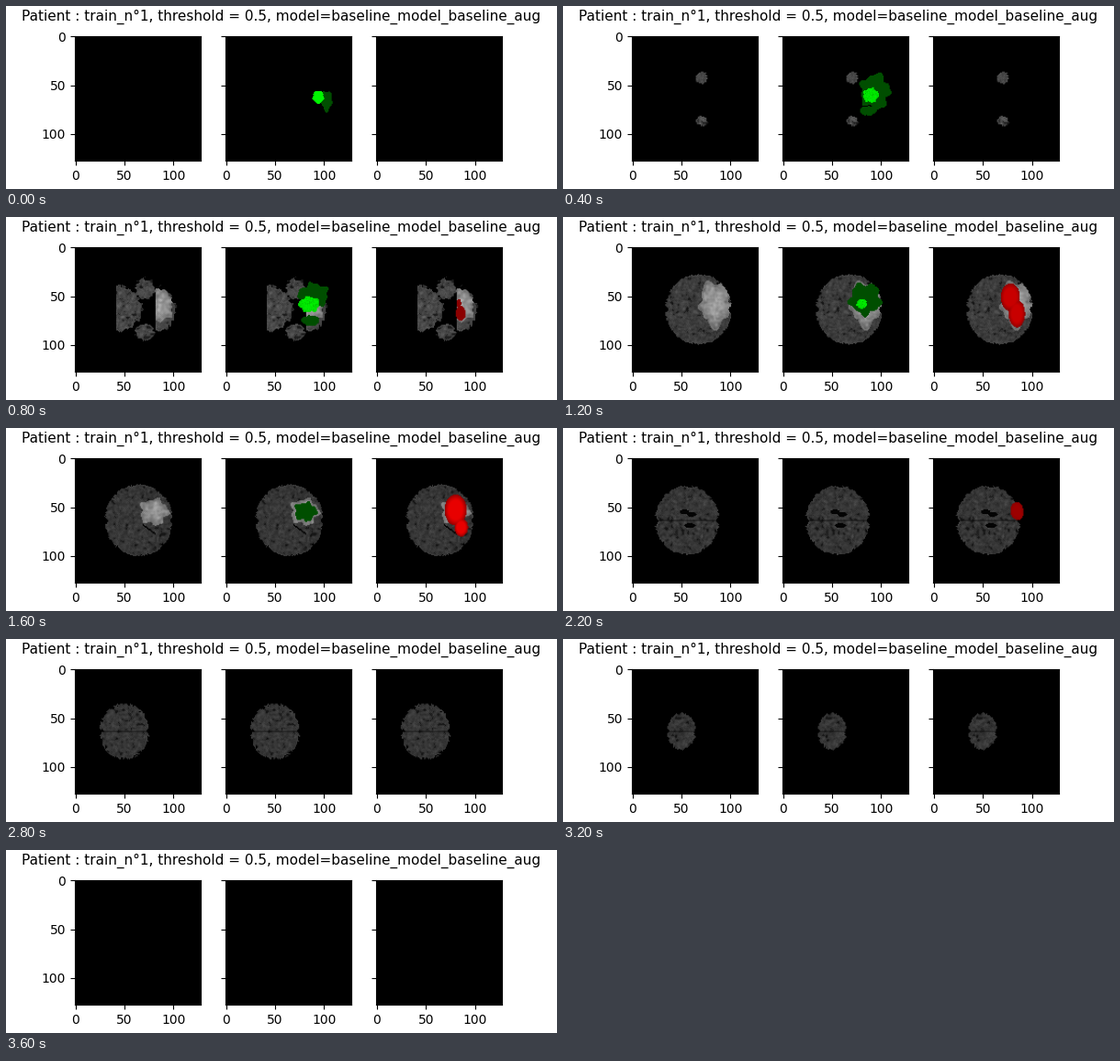
These frames come from a looping animation (600x200 px, 4 s). A matplotlib script:

```python
import numpy as np
import matplotlib.pyplot as plt
from matplotlib.animation import FuncAnimation

N, FRAMES = 128, 20
SCALE = 136.76 / N
# Shapes are given in stage pixels of the left panel.
X, Y = np.meshgrid(75 + (np.arange(N) + 0.5) * SCALE,
                   32.6 + (np.arange(N) + 0.5) * SCALE)

# Key ellipses by step: centre and radii
DARK = {0: (185, 104, 6, 11), 1: (178, 98, 16, 22), 4: (171, 86, 16, 13),
        6: (165, 90, 17, 17), 8: (162, 92, 12, 10), 10: (162, 91, 2, 2)}
LOWER = {2: (168, 115, 9, 5), 5: (167, 113, 10, 6)}
BRIGHT = {0: (176, 100, 6, 7), 4: (166, 96, 11, 8.5), 7: (159, 95, 3, 4)}
LESION = {3: (171, 98, 9, 15), 6: (166, 95, 17, 25), 8: (161, 92, 15, 14),
          10: (162, 91, 6, 6)}
RED_TOP = {4: (165, 95, 2.5, 5), 6: (159, 88, 10.5, 15), 8: (161.5, 90, 12, 17),
           11: (166, 91, 7, 9.5), 13: (167, 91, 3, 5)}
RED_LOW = {4: (167, 106, 5.5, 8), 6: (166, 106, 9, 15), 8: (167.5, 109, 7.5, 10),
           11: (168, 95, 5, 6), 13: (167, 92, 2, 4)}


def noise(rng, passes):
    a = rng.standard_normal((N, N))
    for _ in range(passes):
        a = (a + sum(np.roll(a, s, ax) for s in (-1, 1) for ax in (0, 1))) / 5
    return a / a.std()


def oval(cx, cy, rx, ry):
    """Relative distance from the centre; inside is < 1."""
    return np.hypot((X - cx) / rx, (Y - cy) / ry)


def blob(keys, k, lumps=0.0):
    """Morphing ellipse with a lumpy rim, empty outside its steps."""
    steps = list(keys)
    if not steps[0] <= k <= steps[-1]:
        return np.full((N, N), 9.0)
    cx, cy, rx, ry = (np.interp(k, steps, v) for v in zip(*keys.values()))
    ang = np.arctan2(Y - cy, X - cx)
    rim = 1 + lumps * (np.sin(5 * ang + k) + 0.6 * np.sin(9 * ang))
    return oval(cx, cy, rx, ry) / rim


def low_slice(k, rough):
    """Separate lobes that grow together, with a cut edge on the right."""
    s = 0.2 + 0.2 * k
    mask = np.zeros((N, N), bool)
    for cy, ry in ((79, 11), (126, 9)):
        mask |= oval(151, cy, 10.5 * s, ry * s) + 0.08 * rough < 1
    if k > 2:
        left = oval(122, 101, 25 * s, 25 * s) + 0.06 * rough < 1
        right = oval(164, 102, 20 * s, 24 * s) + 0.05 * rough < 1
        mask |= left & (X > 144 - 24 * s) | right & (X > 163)
    return mask


def closed_slice(k, rough):
    """Cross-section of a rounded body, with a notch at the midline."""
    cx = np.interp(k, [5, 8, 11, 14], [149, 144.5, 135, 129])
    ry = 39.2 * (1 - (abs(k - 8) / 9.2) ** 2.3) ** 0.5
    rx = 37 * (1 - (abs(k - 8) / 9.05) ** 2.3) ** 0.6
    notch = 0.1 * np.exp(-((Y - 101.5) / 2.5) ** 2)
    ragged = 0.025 + 0.03 * (k > 12)
    return oval(cx, 101.3, rx, ry) + notch + ragged * np.abs(rough) < 1.01


def brain(k, rng):
    rough, fine = noise(rng, 2), noise(rng, 0)
    if 2 <= k <= 4:
        mask = low_slice(k, rough)
    elif 5 <= k <= 17:
        mask = closed_slice(k, rough)
    else:
        return np.zeros((N, N)), fine

    base = np.interp(k, [4, 6, 8], [72, 60, 54])
    gray = base * (1 + 0.12 * rough + 0.06 * fine)
    gray[rough < -1.7] *= 0.6
    q = blob(LESION, k, 0.12)
    glow = 112 + 45 * (1 - q ** 2) + 9 * rough
    gray = np.where(q < 1, glow, gray)

    if 7 <= k <= 9:
        slit = np.abs(Y - 107 - 0.75 * (X - 150)) < 1
        gray[slit & (np.abs(X - 156) < 7)] = 8
    if 9 <= k <= 12:
        for cx, cy, rx in ((132, 92, 5), (140, 95, 5), (138, 107, 6)):
            gray[oval(cx, cy, rx, 2.6) < 1] = 4
    if k >= 9:
        gray[np.abs(Y - 101.7) < 0.8] *= 0.5
    return np.where(mask, gray, 0), fine


def panels(k):
    gray, fine = brain(k, np.random.default_rng(40 + k))
    plain = np.repeat(gray[..., None], 3, axis=2)
    truth, guess = plain.copy(), plain.copy()

    truth[(blob(DARK, k, 0.12) < 1) | (blob(LOWER, k, 0.05) < 1)] = (0, 78, 0)
    core = blob(BRIGHT, k, 0.08) < 1
    truth[core] = 0
    truth[core, 1] = (245 - (k > 0) * 22 * np.abs(fine))[core]

    q = np.minimum(blob(RED_TOP, k), blob(RED_LOW, k))
    peak = np.interp(k, [4, 6, 8, 11], [140, 200, 232, 156])
    red = 138 + (peak - 138) * np.clip(1.3 * (1 - q ** 3), 0, 1)
    guess[q < 1] = 0
    guess[q < 1, 0] = red[q < 1]
    return [np.clip(p, 0, 255).astype(np.uint8) for p in (plain, truth, guess)]


slices = [panels(k) for k in range(FRAMES)]

plt.rcParams["font.family"] = "DejaVu Sans"
fig, axes = plt.subplots(1, 3, sharey=True, figsize=(6, 2), dpi=100)
fig.suptitle("Patient : train_n°1, threshold = 0.5, "
             "model=baseline_model_baseline_aug", fontsize=11)
images = [ax.imshow(p) for ax, p in zip(axes, slices[0])]
for ax in axes:
    ax.set_xticks([0, 50, 100])
    ax.set_yticks([0, 50, 100])


def update(k):
    for im, p in zip(images, slices[k]):
        im.set_data(p)
    return images


anim = FuncAnimation(fig, update, frames=FRAMES, interval=200,
                     repeat=True, repeat_delay=0, blit=False)
plt.show()
```
